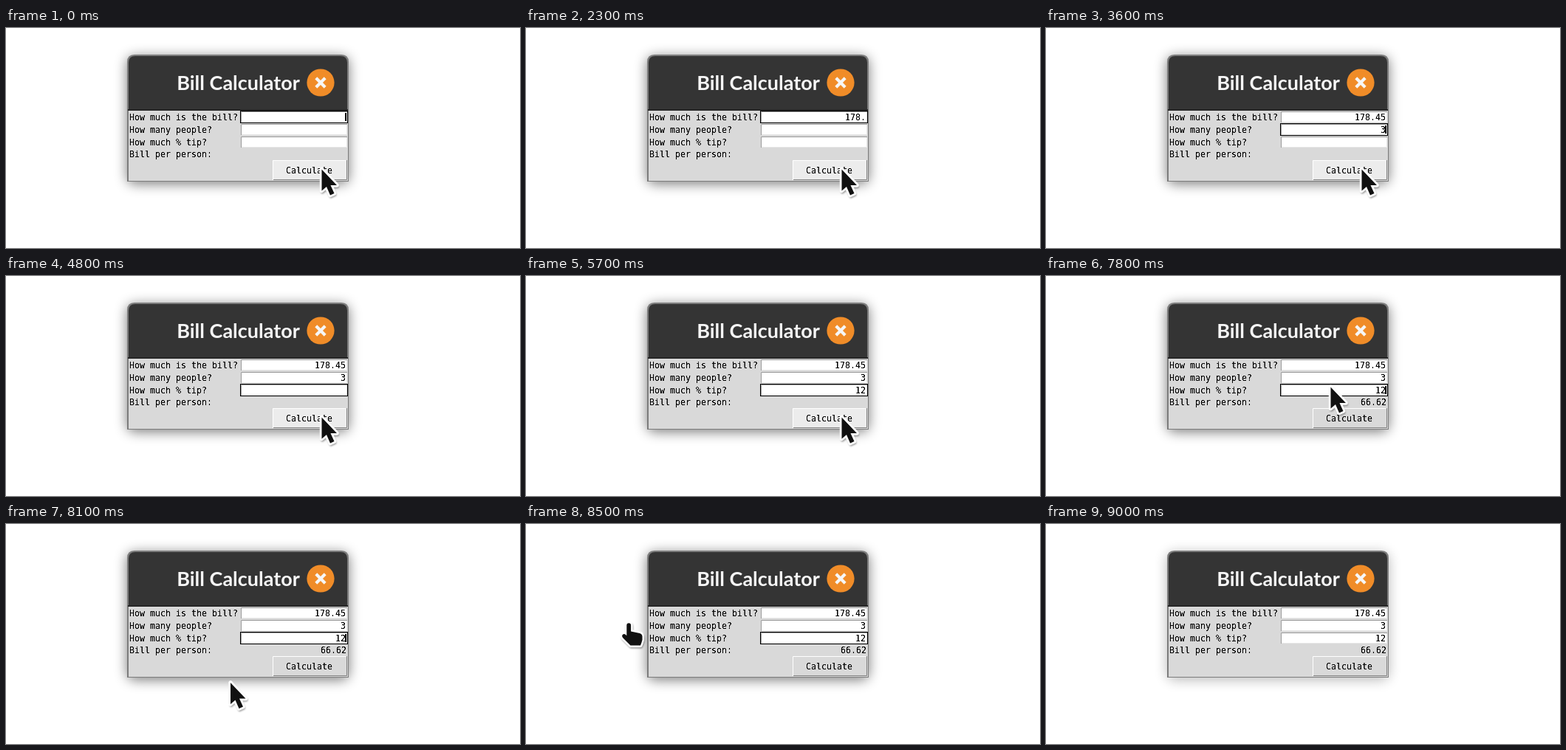
An HTML page for the animation above (9.1 s loop, 696x298 px).

```html
<!DOCTYPE html>
<html lang="en">
<head>
<meta charset="utf-8">
<title>Bill Calculator</title>
<style>
  html, body { margin: 0; width: 100%; height: 100%; overflow: hidden; background: #fff; }
  svg { display: block; width: 696px; height: 298px; }
  .mono { font: 11.63px "DejaVu Sans Mono", "Liberation Mono", monospace; fill: #000; filter: url(#crisp); }
  .title { font: 700 27px Lato, "Open Sans", sans-serif; fill: #f6f6f6; }
  .end { text-anchor: end; }
</style>
</head>
<body>
<svg viewBox="0 0 696 298" xmlns="http://www.w3.org/2000/svg">
  <defs>
    <filter id="blur" x="-20%" y="-30%" width="140%" height="160%"><feGaussianBlur stdDeviation="8.5"/></filter>
    <filter id="soft" x="-30%" y="-30%" width="170%" height="170%"><feGaussianBlur stdDeviation="1.2"/></filter>
    <!-- Hardens text edges towards a bitmap look -->
    <filter id="crisp" filterUnits="userSpaceOnUse" x="0" y="0" width="696" height="298">
      <feComponentTransfer><feFuncA type="linear" slope="2" intercept="-.35"/></feComponentTransfer>
    </filter>
    <path id="arrowShape" d="M0 0V29L6.5 23.5 11.5 35 17 32.5 12 21.5H20.5Z"/>
    <path id="handShape" d="M8.3 5.2Q8.3 2.2 11.2 2.2T14.1 5.2V13.5L26 16Q29.5 17 29.5 20.5V25Q28.5 29 27 32.5H13.5L3.5 22.5Q1 20 3 17.8Q5 16 7 18L8.3 19.3Z"/>
  </defs>

  <rect id="shadow" x="164" y="39" width="300" height="172" rx="9" filter="url(#blur)"/>
  <path d="M164 208V46Q164 36 174 36H454Q464 36 464 46V208Z" fill="#7c7c7c"/>
  <path d="M166 112V47Q166 38 175 38H453Q462 38 462 47V112Z" fill="#343434"/>
  <rect x="165" y="110" width="298" height="2" fill="#262626"/>
  <rect x="166" y="112" width="297" height="95" fill="#d9d9d9"/>

  <text class="title" x="314.5" y="83.5" text-anchor="middle">Bill Calculator</text>
  <circle cx="426" cy="74" r="18.6" fill="#f08c28"/>
  <path d="M419.8 67.8L432.2 80.2M432.2 67.8L419.8 80.2" stroke="#f6f6f6" stroke-width="4.2"/>

  <g class="mono">
    <text x="167" y="125">How much is the bill?</text>
    <text x="167" y="142">How many people?</text>
    <text x="167" y="159">How much % tip?</text>
    <text x="167" y="175">Bill per person:</text>
    <text id="result" class="end" x="461" y="175"></text>
  </g>
  <g id="fields"></g>
  <rect id="ring" x="317.5" width="145" height="16" fill="none" stroke="#000"/>
  <rect id="caret" x="459" width="2" height="11"/>

  <rect id="face" x="361" y="179" width="101" height="27"/>
  <path id="edgeA" d="M361.5 206V179.5H462" fill="none"/>
  <path id="edgeB" d="M362 205.5H461.5V179" fill="none"/>
  <text id="label" class="mono">Calculate</text>

  <g id="arrow" stroke-linejoin="round">
    <use href="#arrowShape" x="1" y="2" stroke="#000" stroke-width="4" opacity=".4" filter="url(#soft)"/>
    <use href="#arrowShape" fill="#fff" stroke="#fff" stroke-width="5.5"/>
    <use href="#arrowShape" fill="#111"/>
  </g>
  <g id="hand" stroke-linejoin="round">
    <use href="#handShape" x="1" y="2" stroke="#000" stroke-width="4" opacity=".4" filter="url(#soft)"/>
    <use href="#handShape" fill="#fff" stroke="#fff" stroke-width="5"/>
    <use href="#handShape" fill="#111"/>
  </g>
</svg>
<script>
const LOOP = 9100, ROW = 17;
const el = id => document.getElementById(id);
const set = (node, attrs) => { for (const k in attrs) node.setAttribute(k, attrs[k]); };
const show = (node, on) => set(node, { visibility: on ? "visible" : "hidden" });

// Times at which each character of a field is typed
const fields = [
  { text: "178.45", keys: [1400, 1500, 1700, 2200, 2600, 2800] },
  { text: "3", keys: [3600] },
  { text: "12", keys: [5100, 5200] }
];
const focusTimes = [3200, 4200];
// The caret starts visible and flips at each of these times
const blinks = [1500, 2000, 2300, 2600, 3800, 4100, 4800, 5100, 5700, 6400, 6600, 6900, 7500, 7800, 8400, 8700];
const PRESS = 6400, RELEASE = 6900, MOVE = 7500, HAND = 8500, GONE = 8700, BLUR = 9000;
const rest = [427.5, 191.5];
// One pointer position per 100 ms
const path = [[424, 188], [412, 176], [398, 162], [385.5, 150.5], [368, 139], [343, 162],
  [304, 215], [262, 266], [211, 232], [165, 177], [128, 132], [64, 20]];

fields.forEach((f, i) => {
  const y = 112 + ROW * i;
  el("fields").insertAdjacentHTML("beforeend",
    `<rect x="318" y="${y + 1}" width="144" height="15" fill="#fff"/>
     <path d="M319 ${y + 15.5}H461.5V${y + 1}" fill="none" stroke="#e6e6e6"/>
     <path d="M318.5 ${y + 16}V${y + 1.5}H462" fill="none" stroke="#999"/>
     <text class="mono end" x="460" y="${y + 13}"></text>`);
  f.node = el("fields").lastElementChild;
});

const passed = (times, t) => times.filter(at => t >= at).length;

function render(t) {
  const active = t < BLUR;
  const row = passed(focusTimes, t);
  fields.forEach(f => { f.node.textContent = f.text.slice(0, passed(f.keys, t)); });
  el("result").textContent = t >= RELEASE ? "66.62" : "";

  set(el("shadow"), { opacity: active ? 0.52 : 0.28 });
  set(el("ring"), { y: 112.5 + ROW * row });
  show(el("ring"), active);
  set(el("caret"), { y: 115 + ROW * row });
  show(el("caret"), active && passed(blinks, t) % 2 === 0);

  const [x, y] = t < MOVE ? rest : path[Math.min(path.length - 1, Math.floor((t - MOVE) / 100))];
  const place = { transform: `translate(${x} ${y})` };
  set(el("arrow"), place);
  set(el("hand"), place);
  show(el("arrow"), t < HAND);
  show(el("hand"), t >= HAND && t < GONE);

  const hover = t < HAND && x >= 361 && y >= 179;
  const down = t >= PRESS && t < RELEASE;
  const shift = down ? 2 : 0;
  set(el("face"), { fill: hover ? "#ececec" : "#d9d9d9" });
  set(el("edgeA"), { stroke: down ? "#828282" : "#fff" });
  set(el("edgeB"), { stroke: down ? "#fff" : "#828282" });
  set(el("label"), { x: 379 + shift, y: 197 + shift });
}

const start = performance.now();
function tick() {
  render((performance.now() - start) % LOOP);
  requestAnimationFrame(tick);
}
tick();
</script>
</body>
</html>
```
